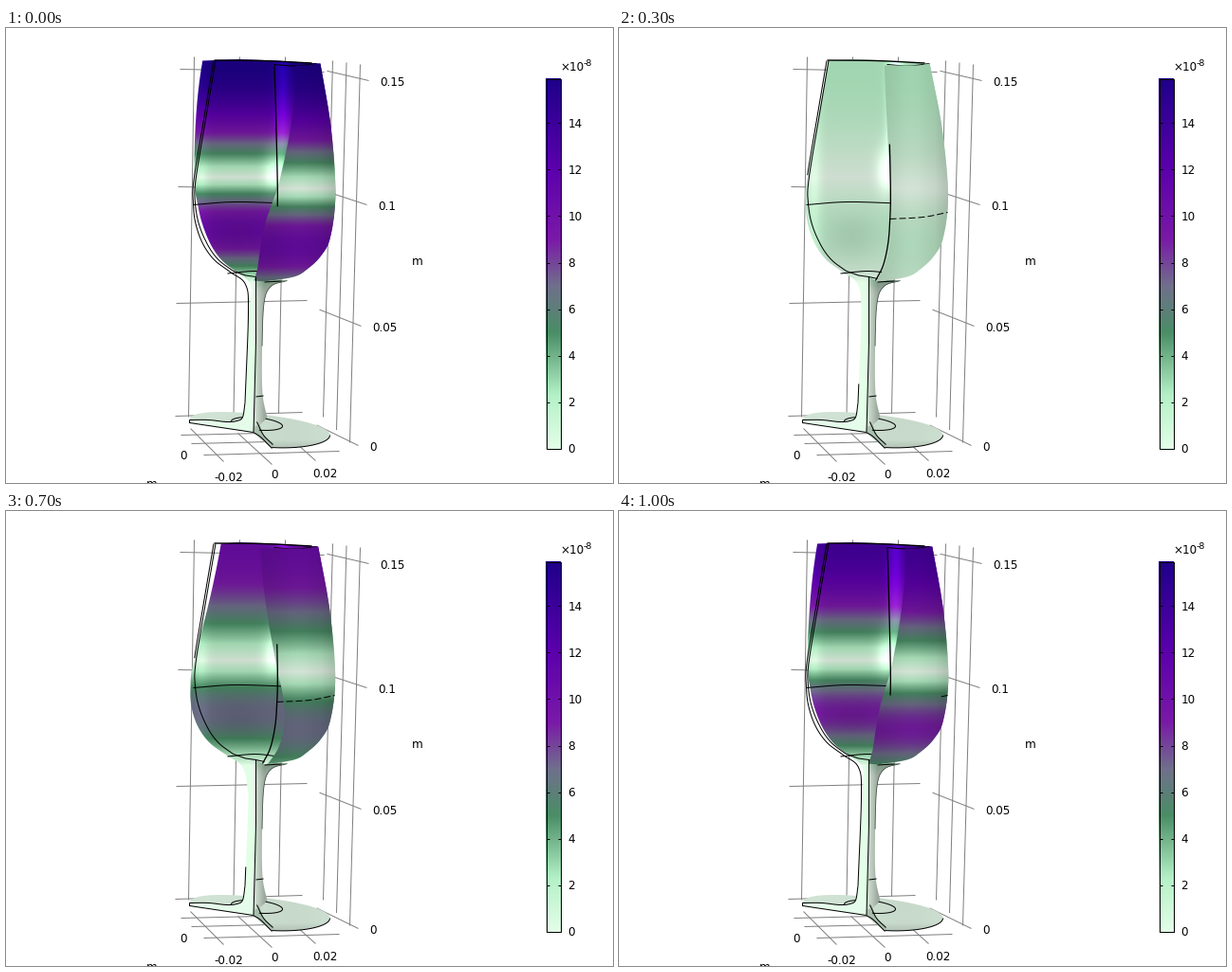
These frames come from a looping animation (640 by 480 pixels, 1100 ms). A matplotlib script:

```python
import numpy as np
import matplotlib.pyplot as plt
from matplotlib.animation import FuncAnimation
from matplotlib.path import Path

W, H, DPI, FRAMES = 640, 480, 100, 11
PX = 72 / DPI
TOP, PEAK, DIP = 35, 15.9, 10.6  # rim height, largest swing at rim and in belly
GRAY = "#808080"

plt.rcParams["font.family"] = "DejaVu Sans"
fig = plt.figure(figsize=(W / DPI, H / DPI), dpi=DPI, facecolor="white")
ax = fig.add_axes([0, 0, 1, 1])
ax.axis("off")


# ---------- helpers ----------
def smooth(pts, n=10):
    """Catmull-Rom curve through the points."""
    p = np.asarray(pts, float)
    p = np.vstack([2 * p[0] - p[1], p, 2 * p[-1] - p[-2]])
    t = np.linspace(0, 1, n, endpoint=False)[:, None]
    parts = []
    for a, b, c, d in zip(p, p[1:], p[2:], p[3:]):
        parts.append(0.5 * (2 * b + (c - a) * t + (2 * a - 5 * b + 4 * c - d) * t**2
                            + (3 * b - a - 3 * c + d) * t**3))
    return np.vstack(parts + [p[-2:-1]])


def line(pts, color="black", z=5, lw=1.0, **kw):
    x, y = np.asarray(pts, float).T
    return ax.plot(x, y, color=color, lw=lw * PX, zorder=z, solid_capstyle="butt", **kw)[0]


def fill(pts, color, z):
    ax.fill(*np.asarray(pts, float).T, color=color, lw=0, zorder=z)


def label(x, y, s, size=12, ha="center"):
    """Text whose digits are centred vertically on y."""
    ax.text(x, y + 0.365 * size, s, size=size * PX, ha=ha, va="baseline", zorder=9)


def clip(im, *parts):
    xy = np.vstack(parts)
    im.set_clip_path(Path(np.vstack([xy, xy[:1]])), ax.transData)


def paint(box, rgb, z):
    x0, x1, y0, y1 = box
    return ax.imshow(rgb, extent=(x0 - .5, x1 - .5, y1 - .5, y0 - .5), zorder=z,
                     interpolation="nearest", aspect="auto")


def grid(box):
    x0, x1, y0, y1 = box
    return np.meshgrid(np.arange(x0, x1, dtype=float), np.arange(y0, y1, dtype=float))


def bump(v, mid, width):
    return np.exp(-((v - mid) / width) ** 2)


def ramp(v, a, b):
    return np.clip((v - a) / (b - a), 0, 1)


# ---------- colour scale ----------
LEVELS = [0, 2.3, 5, 7, 9, 12, PEAK]
COLORS = np.array([(228, 255, 232), (180, 241, 198), (74, 142, 102), (112, 112, 140),
                   (122, 26, 168), (92, 0, 172), (30, 0, 138)]) / 255


def tint(v):
    return np.stack([np.interp(v, LEVELS, c) for c in COLORS.T], axis=-1)


def lit(u, gain, glow=0 * np.ones(1)):
    """Scale colour under a lamp; pale parts turn greyer."""
    c = tint(u)
    fade = (.35 * np.exp(-u) * ramp(gain, 1, .9))[..., None]
    c = c + (c.mean(axis=-1, keepdims=True) - c) * fade
    return np.clip(c * gain[..., None] + glow[..., None], 0, 1)


# ---------- swing along the height ----------
def swing(y, node, end):
    """Signed mode shape: quarter sine above the node, half sine down to the end."""
    upper = PEAK * np.sin(np.pi / 2 * ramp(y, node, TOP))
    lower = DIP * np.sin(np.pi * ramp(y, node, end))
    return upper - lower


def displaced(rest, amount, node, end):
    out = rest.copy()
    out[:, 0] += amount * swing(rest[:, 1], node, end)
    return out


# ---------- axes box ----------
def between(a, b, n=3):
    return zip(np.linspace(a, b, n)[:, None, :].reshape(n, 2))


for (p,), (q,) in zip(between((198, 30), (294, 30)), between((192, 410), (287, 406))):
    line([p, q], GRAY, 1)
for (p,), (q,) in zip(between((344, 34), (373, 38)), between((334, 410), (362, 437))):
    line([p, q], GRAY, 1)

RUNGS = [("0.15", (183, 43), (335, 46), (382, 55)), ("0.1", (181, 167), (337, 170), (380, 186)),
         ("0.05", (179, 290), (317, 287), (374, 314)), ("0", (178, 409), (312, 405), (371, 440))]
for s, left, corner, right in RUNGS:
    line([left, corner], GRAY, 1)
    line([(right[0] - 44, right[1] - .6 * (right[1] - left[1]) - 3), right], GRAY, 1)
    label(right[0] + 11.5, right[1] + .8, s, ha="left")

for p, q in [((184, 429), (268, 427)), ((195, 438), (277, 436)), ((208, 450), (351, 446)),
             ((194, 422), (229, 457)), ((244, 427), (280, 460)), ((306, 438), (326, 456))]:
    line([p, q], GRAY, 1)
for x, y, s in [(186, 450.5, "0"), (234, 473.5, "-0.02"), (282, 470.5, "0"),
                (335.5, 469.5, "0.02"), (433, 245.5, "m"), (153.5, 480, "m")]:
    label(x, y, s)

# ---------- colour bar ----------
BAR_TOP, BAR_END = 53, 443.5
UNIT = (BAR_END - BAR_TOP) / PEAK
bar = (569, 585, 53, 444)
paint(bar, tint((BAR_END - grid(bar)[1]) / UNIT), 3)
line([(569, 53), (584, 53), (584, 443.4), (569, 443.4), (569, 53)], z=4)
for v in range(0, 15, 2):
    y = BAR_END - UNIT * v
    line([(569, y), (572, y)], z=4)
    line([(581, y), (584, y)], z=4)
    label(592, y, str(v), ha="left")
label(584, 40, "×10", ha="left")
label(608, 36.5, "-8", size=9.5, ha="left")


# ---------- foot ----------
def tilted(cx, cy, rx, ry, tilt, start, stop, sag=0):
    t = np.radians(np.linspace(start, stop, 60))
    y = cy + tilt * np.cos(t) + ry * np.sin(t) + sag * np.sin(t) ** 2
    return np.column_stack([cx + rx * np.cos(t), y])


RIM = (267, 421, 74, 17, 8)
fbox = (185, 350, 400, 450)
fx, fy = grid(fbox)
shade = .94 - .04 * bump(fx, 300, 50) - .08 * ramp(fy, 434, 441)
clip(paint(fbox, np.array([222, 242, 226]) / 255 * shade[..., None], 2),
     tilted(*RIM, -180, 80, sag=3), [(268, 433), (260, 426), (193, 416)])

sole = smooth([(193, 413), (213, 413), (232, 415), (243, 414), (249, 410), (251.5, 395)])
fill(np.vstack([sole, [(262, 395), (260, 426), (193, 416)]]), "#e4fce9", 2.2)
fill([(264, 405), (270, 428), (282, 439), (280, 443), (268, 433), (260, 426)], "#a9bfae", 2.2)
line(sole, z=4)
line([(193, 413), (193, 416), (260, 426)], z=4)
line(smooth([(260, 426), (268, 431), (280, 443)]), z=4)
line(smooth([(264, 415), (271, 429), (281, 439)]), z=4)
line(tilted(*RIM, 0, 80, sag=3), z=4)
line(tilted(264, 417, 27, 6.5, 2.5, -70, 85), z=4)
line(tilted(264, 417, 27, 6.5, 2.5, 180, 235), z=4)

# ---------- stem, outer side ----------
flare = smooth([(296, 266), (279, 272), (271.5, 290), (269.5, 340), (270, 385), (275, 411)])
sbox = (255, 300, 255, 430)
sx, sy = grid(sbox)
gain = .88 - .2 * ramp(sx, 263, 272) - .05 * bump(sy, 267, 9)
clip(paint(sbox, lit(1.6 * bump(sy, 264, 9), gain), 2.4),
     [(263, 262)], flare, [(266, 419), (261, 420)])
line(flare[:30], "#3c4a40", 2.5, .8)
line([(263, 388.5), (271, 387.5)], z=4)
line([(263, 262), (263, 330), (260.5, 426)], z=4)

# ---------- bowl at rest ----------
profile = smooth([(218.5, 34), (209, 90), (197.5, 160), (197, 185), (199.5, 206), (207, 227),
                  (219, 244), (236, 257), (252, 270), (255, 300), (251.5, 395)])
seam = smooth([(282.5, 39), (284, 90), (285.8, 170), (285, 205), (283, 228), (278, 250),
               (270, 266)])
side = smooth([(327, 37), (340, 105), (346.5, 175), (341.5, 220), (331.5, 240), (317, 254),
               (303, 262), (272, 267)])

# ---------- bowl surfaces ----------
box = (180, 360, 25, 425)
X, Y = grid(box)
IN, OUT = (157, 268), (169, 290)  # nodal height and lower end of the two walls
u_in, u_out = abs(swing(Y, *IN)), abs(swing(Y, *OUT))
upper = ramp(Y, 175, 115)
gain_in = (.89 + .4 * bump(X, 291, 8) * upper + .1 * bump(X, 205, 8)
           - .07 * bump(Y, 220, 25) * bump(X, 245, 28) + .11 * ramp(Y, 256, 268))
glow_in = .2 * bump(X, 281, 10) * bump(Y, 150, 25)
gain_out = .81 + .07 * bump(X, 308, 22) - .08 * ramp(X, 332, 348)
glow_out = .03 * bump(Y, 167, 22)

blank = np.ones(X.shape + (3,))
inner, outer = paint(box, blank, 3), paint(box, blank, 3.6)

# ---------- rest-shape edges ----------
profile_line = line(profile, z=3.3)
lip = profile[profile[:, 1] < 257]
lip = lip + np.column_stack([2 + 2.5 * ramp(lip[:, 1], 185, 225), 0 * lip[:, 1]])
line(np.vstack([lip, [(252, 260.5), (263, 262), (272, 264)]]), z=3.3)
line(smooth([(219, 33.5), (270, 34), (322, 36.5)]), z=4, lw=1.4)
line(smooth([(282, 38), (305, 39.5), (327, 37)]), z=3.3)
line(smooth([(197, 186), (240, 183), (295, 184.5)]), z=3.3)
line(smooth([(233, 258.5), (262, 256), (287, 258.5)]), z=3.3)
line([(272, 267.5), (290, 266.5)], z=3.8)
seam_line = line(seam, z=4, lw=1.3)
belt = smooth([(285, 201), (320, 199), (346, 194)], 30)
belt_line = line(belt, z=4, ls=(0, (7, 3)))


def update(i):
    a = np.cos(2 * np.pi * i / FRAMES)
    left = displaced(profile, -.74 * a, IN[0], 300)
    cut = displaced(seam, 1.4 * a, *OUT)
    right = side + np.column_stack([4 * a * a * ramp(side[:, 1], 190, TOP), 0 * side[:, 1]])

    inner.set_data(lit(abs(a) * u_in, gain_in, glow_in))
    clip(inner, left, [(260, 420), (263, 330), (263, 262), (272, 267)], right[::-1],
         [(285, 34), (245, 32.5)])
    outer.set_data(lit(abs(a) * u_out, gain_out, glow_out))
    clip(outer, cut, right[::-1], [(316, 39)])

    # rest edges vanish where the moved surface covers them
    y = profile[:, 1]
    covered = (a < 0) & (y > 157) & (y < 370)
    profile_line.set_data(np.where(covered, np.nan, profile[:, 0]), y)

    top, end = (0, 221 - 31 * a) if a > 0 else (116 - 33 * a, 266)
    seam_line.set_data(*seam[(seam[:, 1] >= top) & (seam[:, 1] <= end)].T)

    start, stop = 284 + 64 * ramp(a, .5, .9), 348 - 53 * ramp(a, -.7, -.9)
    belt_line.set_data(*belt[(belt[:, 0] >= start) & (belt[:, 0] <= stop)].T)
    return []


ax.set_xlim(-.5, W - .5)
ax.set_ylim(H - .5, -.5)
anim = FuncAnimation(fig, update, frames=FRAMES, interval=100, repeat=True, repeat_delay=0,
                     init_func=lambda: update(0), blit=False)
plt.show()
```
